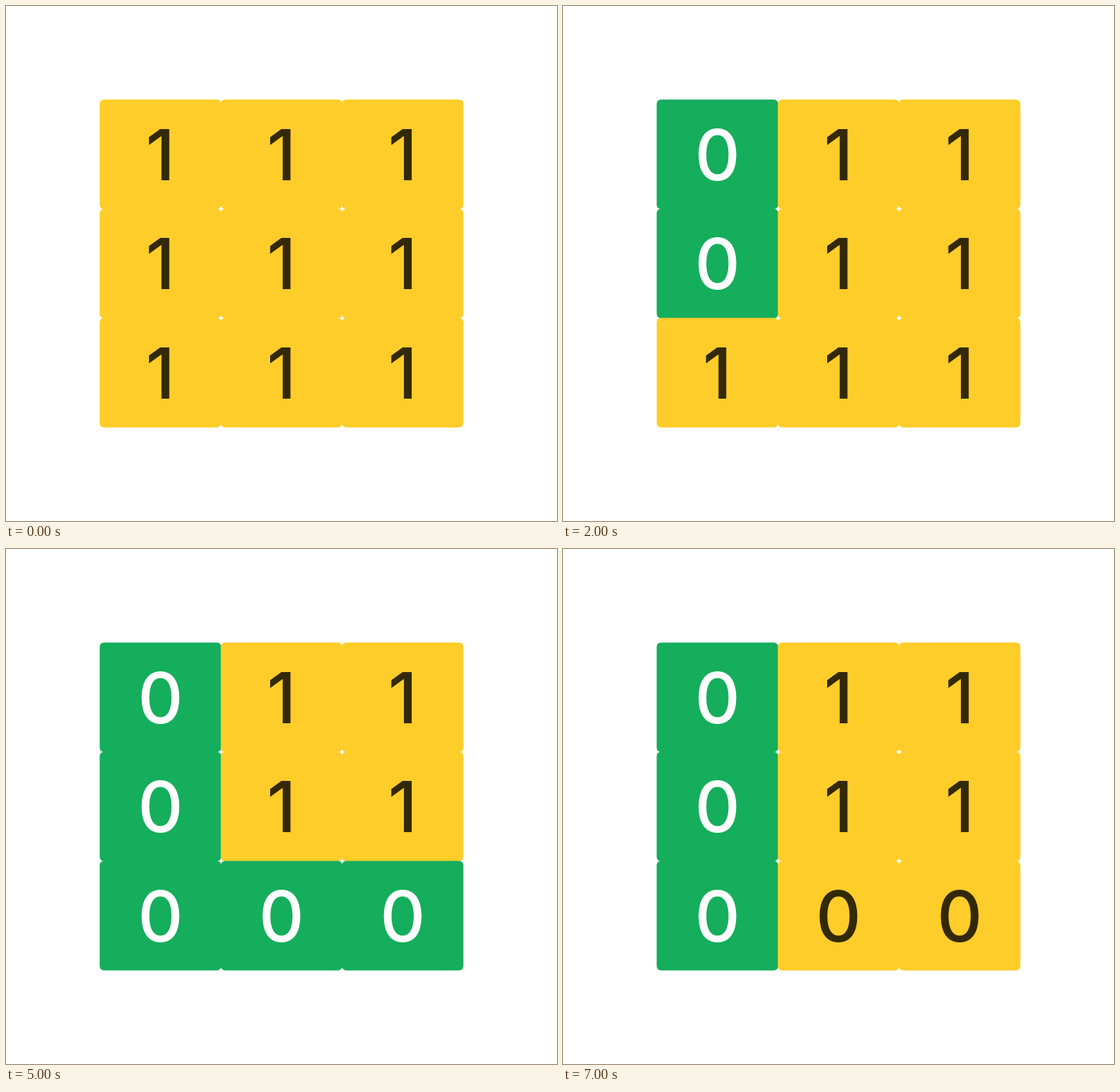
Animation of 774x724 px, one loop 8 s. Source, as an HTML page with a canvas:

```html
<!DOCTYPE html>
<html lang="en">
<head>
<meta charset="utf-8">
<title>Grid path</title>
<style>
  html, body { margin: 0; width: 100%; height: 100%; overflow: hidden; background: #fff; }
  canvas { display: block; }
</style>
</head>
<body>
<canvas id="stage" width="774" height="724"></canvas>
<script>
const ctx = document.getElementById('stage').getContext('2d');
const STEP_MS = 1000, STEPS = 8;
const LEFT = 131.6, TOP = 131.5;
const STEP_X = 170.15, STEP_Y = 153.55;
const CELL_W = 170.6, CELL_H = 153.9, RADIUS = 6;
const BASELINE = 113.3;

const OPEN = { fill: '#ffcd29', ink: '#332908' };
const ACTIVE = { fill: '#14ae5c', ink: '#ffffff' };

// Cells on the path: steps at which each is entered and left again.
const path = [
  { row: 0, col: 0, enter: 1, leave: STEPS },
  { row: 1, col: 0, enter: 2, leave: STEPS },
  { row: 2, col: 0, enter: 3, leave: STEPS },
  { row: 2, col: 1, enter: 4, leave: 7 },
  { row: 2, col: 2, enter: 5, leave: 6 },
];

function drawCell(row, col, step) {
  const visit = path.find(p => p.row === row && p.col === col);
  const visited = Boolean(visit) && step >= visit.enter;
  const style = visited && step < visit.leave ? ACTIVE : OPEN;
  const x = LEFT + col * STEP_X;
  const y = TOP + row * STEP_Y;

  ctx.fillStyle = style.fill;
  ctx.beginPath();
  ctx.roundRect(x, y, CELL_W, CELL_H, RADIUS);
  ctx.fill();

  ctx.fillStyle = style.ink;
  ctx.fillText(visited ? '0' : '1', x + CELL_W / 2, y + BASELINE);
}

function draw(now) {
  const step = Math.floor(now / STEP_MS) % STEPS;
  ctx.fillStyle = '#fff';
  ctx.fillRect(0, 0, 774, 724);
  ctx.font = '500 99px Inter, sans-serif';
  ctx.textAlign = 'center';
  ctx.textBaseline = 'alphabetic';
  for (let row = 0; row < 3; row++) {
    for (let col = 0; col < 3; col++) drawCell(row, col, step);
  }
}

let start;
function frame(now) {
  start ??= now;
  draw(now - start);
  requestAnimationFrame(frame);
}
draw(0);
requestAnimationFrame(frame);
</script>
</body>
</html>
```
